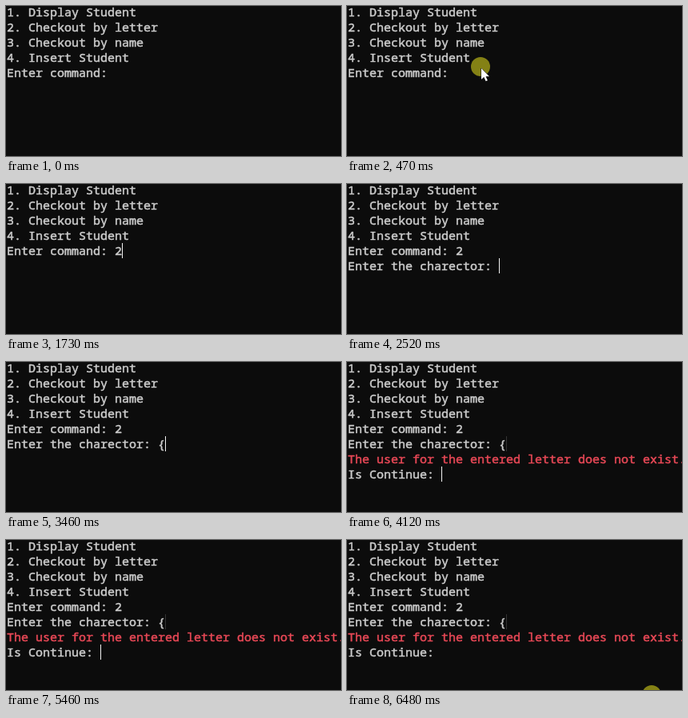
Recreate the animation shown at these times as an HTML page with a canvas. Size 419 by 188 pixels, loop 6.54 s.

```html
<!DOCTYPE html>
<html lang="en">
<head>
<meta charset="utf-8">
<title>Console menu</title>
<style>
  html, body { margin: 0; width: 100%; height: 100%; overflow: hidden; background: #0c0c0c; }
  canvas { display: block; }
</style>
</head>
<body>
<canvas id="stage" width="419" height="188"></canvas>
<script>
const ctx = document.getElementById('stage').getContext('2d', { alpha: false });
const LOOP = 6540, BLINK = 570, CELL = 9, ROW = 19;
const BACK = '#0c0c0c', TEXT = '#cccccc', RED = '#e74856';

const menu = ['1. Display Student', '2. Checkout by letter', '3. Checkout by name', '4. Insert Student'];

// Each prompt appears, takes the caret at focus and may receive one key.
const prompts = [
  { row: 4, label: 'Enter command: ', shown: 0, focus: 540, key: '2', typed: 1730 },
  { row: 5, label: 'Enter the charector: ', shown: 2520, focus: 2520, key: '{', typed: 3460 },
  { row: 7, label: 'Is Continue: ', shown: 4120, focus: 4120, key: '', typed: LOOP }
];
const answered = prompts[2].shown;

const glides = [
  { start: 70, end: 270, until: 1660, from: [290, 145], to: [168, 78], press: 470, release: 600 },
  { start: 5250, end: 5460, until: 5660, from: [409, 91], to: [382, 196] },
  { start: 5660, end: 5870, until: LOOP, from: [396, 172], to: [382, 196], press: 6480, release: LOOP }
];

const arrow = new Path2D('M0 0V14L3.2 11L5.6 16.2L7.9 15.2L5.6 10.2H10Z');
const easeOut = p => 1 - (1 - p) ** 2;

function write(text, row, color = TEXT) {
  const y = row * ROW + 13;
  ctx.fillStyle = ctx.strokeStyle = color;
  ctx.lineWidth = 0.5;
  ctx.fillText(text, 1, y);
  ctx.strokeText(text, 1, y);
}

function bar(col, row, color) {
  ctx.fillStyle = color;
  ctx.fillRect(col * CELL + 1, row * ROW - 2, 1, ROW);
}

function drawPrompt({ row, label, shown, key, typed }, t) {
  if (t >= shown) write(label + (t >= typed ? key : ''), row);
}

function drawCaret(t) {
  const prompt = prompts.findLast(p => t >= p.focus);
  if (!prompt || t >= glides[2].press) return;
  const { row, label, key, focus, typed } = prompt;
  const done = t >= typed;
  const phase = Math.floor((t - (done ? typed : focus)) / BLINK);
  if (phase % 2 === 0) bar(label.length + (done ? key.length : 0), row, '#f2f2f2');
}

function drawPointer(t) {
  const glide = glides.find(g => t >= g.start && t < g.until);
  if (!glide) return;
  const { start, end, from, to, press, release } = glide;

  // The pointer moves in three visible hops.
  const hop = Math.min(3, Math.floor((t - start) / (end - start) * 3));
  const [x, y] = from.map((v, i) => Math.round(v + (to[i] - v) * easeOut(hop / 3)));

  ctx.save();
  ctx.translate(x, y);
  if (t >= press && t < release) {
    ctx.fillStyle = 'rgba(252, 246, 30, 0.5)';
    ctx.beginPath();
    ctx.arc(-1, -2, 12, 0, Math.PI * 2);
    ctx.fill();
  }
  ctx.strokeStyle = '#000000';
  ctx.lineWidth = 1;
  ctx.stroke(arrow);
  ctx.fillStyle = '#ffffff';
  ctx.fill(arrow);
  ctx.restore();
}

function draw(t) {
  ctx.fillStyle = BACK;
  ctx.fillRect(0, 0, 419, 188);
  ctx.font = '15px "Noto Sans Mono", "DejaVu Sans Mono", monospace';
  ctx.lineJoin = 'round';

  menu.forEach((line, i) => write(line, i));
  prompts.forEach(p => drawPrompt(p, t));
  if (t >= answered) {
    bar(22, 5, '#343434');
    write('The user for the entered letter does not exist.', 6, RED);
  }
  drawCaret(t);
  drawPointer(t);
}

const begin = performance.now();
function tick() {
  draw((performance.now() - begin) % LOOP);
  requestAnimationFrame(tick);
}
tick();
</script>
</body>
</html>
```
